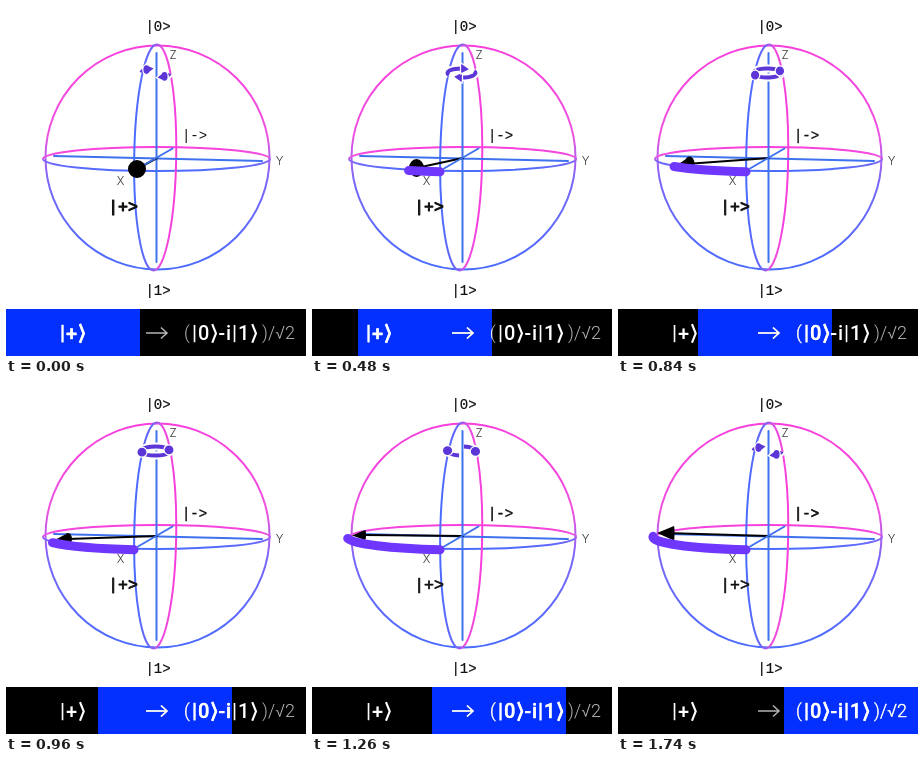
Animation, 300 px wide and 350 px high, one loop 3.54 s. Source, as an HTML page:

```html
<!DOCTYPE html>
<html lang="en">
<head>
<meta charset="utf-8">
<title>Qubit rotation about Z</title>
<style>
  html, body { margin: 0; width: 100%; height: 100%; overflow: hidden; background: #fff; }
  svg { display: block; width: 100%; height: 100%; }
  .mono { font: 14px "Liberation Mono", "DejaVu Sans Mono", monospace; text-anchor: middle; fill: #111; }
  .mono .plus { font-size: 16.5px; }
  .bold { stroke: #111; stroke-linejoin: round; }
  .axis { font: 300 11.5px "Inter", "Roboto", sans-serif; text-anchor: middle; fill: #333; }
  .bar { font: 500 20px "Roboto", "DejaVu Sans", sans-serif; letter-spacing: .9px; fill: #fff; }
  .bar .thin { font-size: 18px; font-weight: 300; letter-spacing: 0; fill: currentColor; }
  .lines { fill: none; stroke-width: 2; }
  .axes { stroke: #3f72ee; stroke-width: 2; stroke-linecap: round; }
  .ring { fill: none; stroke: #5c36d6; stroke-width: 4; }
  .halo { fill: none; stroke: #fff; stroke-width: 8; }
  .ringHead { fill: #5c36d6; stroke: #fff; stroke-width: 2.5; paint-order: stroke; }
</style>
</head>
<body>
<svg viewBox="0 0 300 350">
  <defs>
    <linearGradient id="down" x2="0" y2="1">
      <stop offset="0" stop-color="#f83fdc"/>
      <stop offset=".4" stop-color="#ee52e0"/>
      <stop offset=".6" stop-color="#7a68f8"/>
      <stop offset="1" stop-color="#4a6cff"/>
    </linearGradient>
    <linearGradient id="across">
      <stop offset="0" stop-color="#4a6cff"/>
      <stop offset=".4" stop-color="#6a67f8"/>
      <stop offset=".65" stop-color="#ee4cdf"/>
      <stop offset="1" stop-color="#f83fdc"/>
    </linearGradient>
    <clipPath id="window"><rect id="windowBox" y="303" width="134" height="47"/></clipPath>
    <g id="formula" class="bar">
      <text x="54" y="334">|+⟩</text>
      <path d="M140 327H161M155 321.5L161 327L155 332.5" fill="none" stroke="currentColor" stroke-width="1.5"/>
      <text class="thin" x="178" y="333">(</text>
      <text x="186" y="334">|0⟩-i|1⟩</text>
      <text class="thin" x="256" y="333">)</text>
      <text class="thin" x="262" y="333">/√2</text>
    </g>
  </defs>

  <g class="lines">
    <circle cx="151.5" cy="151.5" r="112" stroke="url(#down)"/>
    <ellipse cx="150.5" cy="153" rx="113.5" ry="12" stroke="url(#down)"/>
    <ellipse cx="149.2" cy="151.5" rx="21" ry="113" stroke="url(#across)" transform="rotate(.9 149.2 151.5)"/>
  </g>
  <g class="axes">
    <path d="M150.5 47V256M48 150L256 155"/>
    <path id="shaft" stroke="#000"/>
    <path d="M132 162.5L166.5 142.5"/>
  </g>
  <path id="head"/>
  <path id="trail" fill="none" stroke="#6f37fd" stroke-width="9" stroke-linecap="round"/>
  <g id="spinner"></g>

  <g class="mono">
    <text x="152" y="25" class="bold" stroke-width=".2">|0&gt;</text>
    <text x="152" y="289" class="bold" stroke-width=".2">|1&gt;</text>
    <text id="plus" class="bold plus" x="117" y="206">|+&gt;</text>
    <text id="minus" class="bold" x="188.5" y="133.5">|-&gt;</text>
  </g>
  <g class="axis">
    <text x="114.500" y="179">X</text>
    <text x="273.500" y="158.500">Y</text>
    <text x="167" y="53">Z</text>
  </g>

  <rect y="303" width="300" height="47"/>
  <rect id="box" y="303" width="134" height="47" fill="#0330ff"/>
  <use href="#formula" color="#b4b4b4"/>
  <g clip-path="url(#window)"><use href="#formula" color="#fff" stroke="#fff" stroke-width=".3"/></g>
</svg>
<script>
  const STEP = 60, LAST = 29, LOOP = 3540;
  const $ = id => document.getElementById(id);
  const setPath = (el, d) => el.setAttribute('d', d);

  // step, base x, base y, base rx, base ry, tip x, tip y
  const ARROW = [
    [0, 131, 163, 9, 9, 131, 163],
    [4, 124, 163, 8.8, 9, 123, 163.5],
    [8, 104.5, 162, 7.5, 9, 100, 164],
    [12, 81, 160.5, 6, 8.5, 70, 162],
    [16, 62, 155, 4, 6, 47, 157],
    [21, 53, 151, 1, 5, 40, 151.5],
    [25, 54, 149.8, .5, 6.5, 38, 150],
    [29, 56, 149.3, .5, 7.2, 39, 149],
  ];
  // step, head angle, tail length in degrees
  const SPIN = [
    [0, 50, 45], [8, 90, 115], [12, 140, 130], [16, 165, 150],
    [21, 185, 85], [25, 210, 25], [29, 230, 45],
  ];

  function sample(table, step) {
    const i = Math.max(1, table.findIndex(row => row[0] >= step));
    const [a, b] = [table[i - 1], table[i]];
    const k = (step - a[0]) / (b[0] - a[0]);
    return a.slice(1).map((v, n) => v + (b[n + 1] - v) * k);
  }

  const rad = deg => deg * Math.PI / 180;
  const onEllipse = (e, deg) =>
    [e.x + e.rx * Math.cos(rad(deg)), e.y + e.ry * Math.sin(rad(deg))];
  const arc = (e, from, to) =>
    `M${onEllipse(e, from)}A${e.rx} ${e.ry} 0 0 1 ${onEllipse(e, to)}`;

  // The triangle winds the same way as its base, so that the overlap stays filled.
  function cone(x, y, rx, ry, tipX, tipY) {
    const side = tipX < x ? ry : -ry;
    return `M${x} ${y - ry}A${rx} ${ry} 0 0 1 ${x} ${y + ry}A${rx} ${ry} 0 0 1 ${x} ${y - ry}` +
      `M${x} ${y + side}L${tipX} ${tipY}L${x} ${y - side}Z`;
  }

  const EQUATOR = { x: 150, y: 153, rx: 115, ry: 13 };
  const RING = { x: 149.5, y: 67, rx: 14, ry: 4.5 };

  const makePath = cls => {
    const el = document.createElementNS('http://www.w3.org/2000/svg', 'path');
    el.setAttribute('class', cls);
    return $('spinner').appendChild(el);
  };
  const layer = cls => [makePath(cls), makePath(cls)];
  const halos = layer('halo'), tails = layer('ring'), heads = layer('ringHead');

  function drawSpinner(step) {
    const [angle, length] = sample(SPIN, step);
    [0, 180].forEach((turn, i) => {
      const a = angle + turn;
      const [x, y] = onEllipse(RING, a);
      const tail = arc(RING, a - length, a);
      setPath(halos[i], tail);
      setPath(tails[i], tail);
      const width = 4.2 * Math.abs(Math.cos(rad(a))) + .4;
      setPath(heads[i], cone(x, y, width, 4.4, ...onEllipse(RING, a + 32)));
    });
  }

  function draw(step) {
    const t = step / LAST;
    const eased = (1 - Math.cos(Math.PI * Math.min(1, t * 1.08))) / 2;

    const arrow = sample(ARROW, step);
    setPath($('shaft'), `M151 152L${arrow[0]} ${arrow[1]}`);
    setPath($('head'), cone(...arrow));
    setPath($('trail'), arc(EQUATOR, 101, 101 + 82 * eased));
    $('trail').style.visibility = step ? 'visible' : 'hidden';
    drawSpinner(step);

    $('plus').style.strokeWidth = 1.1 - .5 * t;
    $('minus').style.strokeWidth = .7 * t;
    for (const id of ['box', 'windowBox']) $(id).setAttribute('x', Math.round(166 * t));
  }

  const start = performance.now();
  function tick() {
    const time = (performance.now() - start) % LOOP;
    draw(Math.min(LAST, Math.floor(time / STEP)));
    requestAnimationFrame(tick);
  }
  tick();
</script>
</body>
</html>
```
